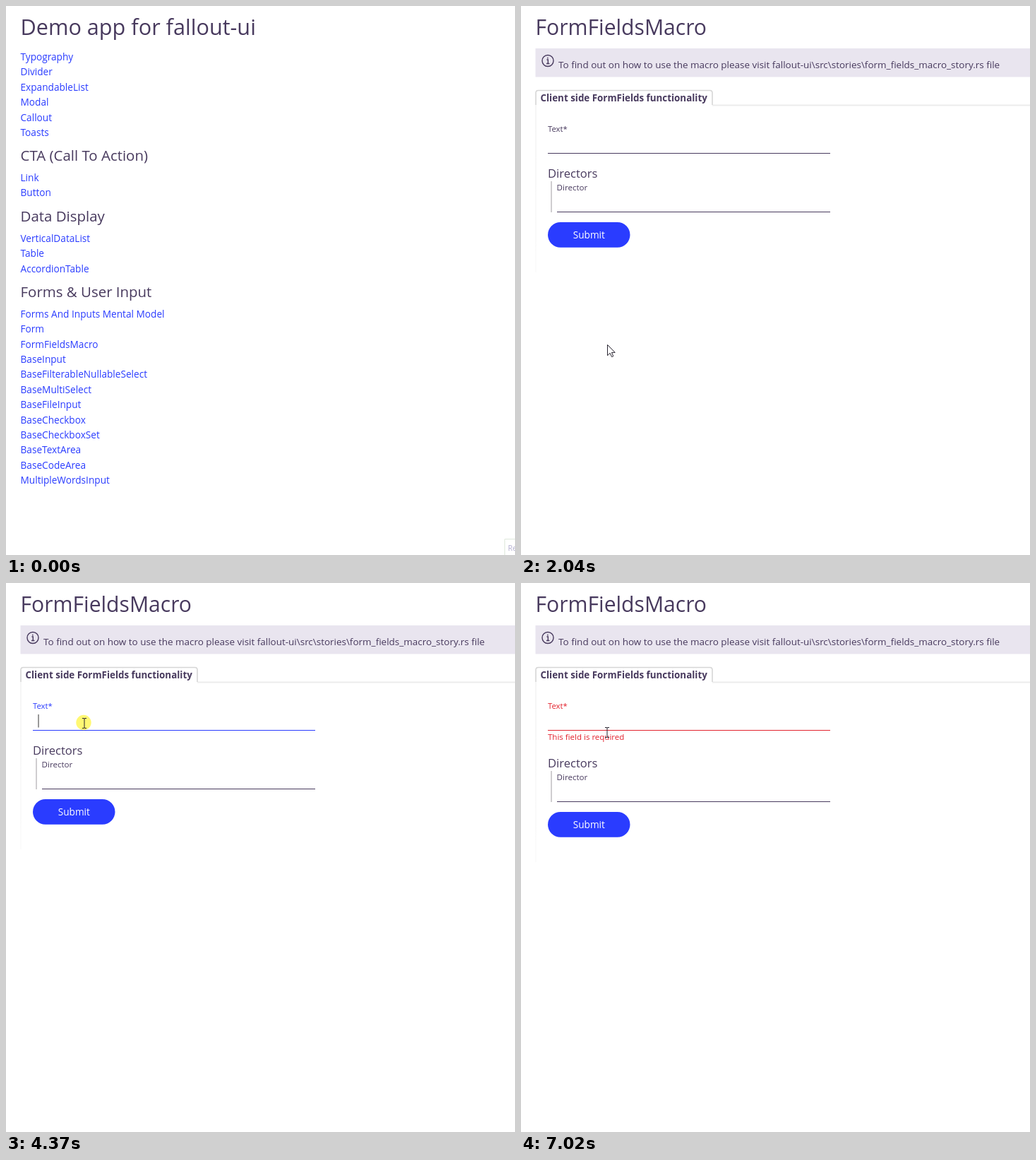
Write an HTML page that moves like this. It is 721x777 px and loops after 8000 ms.

```html
<!DOCTYPE html>
<html lang="en">
<head>
<meta charset="utf-8">
<title>Component demo</title>
<style>
  html, body { margin: 0; width: 100%; height: 100%; overflow: hidden; background: #fff; }
  svg { display: block; width: 721px; height: 777px; }
  text { font: 13.65px "Open Sans", "Noto Sans", sans-serif; fill: #483a5e; }
  .link { fill: #2a3cff; }
  text.h1 { font-size: 30.6px; }
  text.h2 { font-size: 20.45px; }
  text.small { font-size: 11.6px; }
  #form { --accent: #483a5e; }
  #form.focus { --accent: #2a3cff; }
  #form.error { --accent: #e3242f; }
  #label, #message { fill: var(--accent); }
  #field { stroke: var(--accent); }
  .cursor path { fill: #fff; stroke: #27232f; stroke-width: 1; stroke-linejoin: round; }
  .cursor path.line { fill: none; }
</style>
</head>
<body>
<svg viewBox="0 0 721 777">
  <defs>
    <linearGradient id="edge" x1="0" y1="0" x2="0" y2="1">
      <stop offset="0" stop-color="#ececec"/>
      <stop offset="1" stop-color="#f8f8f8"/>
    </linearGradient>
  </defs>

  <g id="menu">
    <text class="h1" x="20.5" y="41">Demo app for fallout-ui</text>
    <path id="underline" d="M20.5 483.5H129" stroke="#2a3cff"/>
    <g id="hint">
      <path d="M722 754.5H706.5V778" fill="none" stroke="#dfe8dc"/>
      <text x="711" y="771" style="font-size:10.5px;fill:#b3aed0">Re</text>
    </g>
  </g>

  <g id="form">
    <text class="h1" x="20.5" y="41" style="font-size:30.1px">FormFieldsMacro</text>
    <rect x="20.5" y="60" width="701" height="40.5" fill="#e9e5ef"/>
    <circle cx="38" cy="77.5" r="8" fill="none" stroke="#483a5e" stroke-width="1.4"/>
    <path d="M36.5 76h1.8v5.3M36 81.5h4.4M37.8 72.8v1.6" fill="none" stroke="#483a5e" stroke-width="1.4"/>
    <text x="53" y="88" style="font-size:13.48px">To find out on how to use the macro please visit fallout-ui\src\stories\form_fields_macro_story.rs file</text>

    <path d="M271 140.5H721" stroke="#ececec" stroke-width="2"/>
    <rect id="side" x="20.5" y="140" width="1" height="237" fill="url(#edge)"/>
    <path d="M21 140V123q0-3.5 3.5-3.5h243q3.5 0 3.5 3.5V140" fill="none" stroke="#d6d6d6" stroke-width="1.6"/>
    <text x="27.5" y="134.7" style="font-size:13.39px;font-weight:700">Client side FormFields functionality</text>

    <text class="small" id="label" x="38" y="178.3" style="font-size:11.3px">Text*</text>
    <path id="field" d="M38 208.5H438"/>
    <path id="caret" d="M46 186V204.5" stroke="#333"/>
    <text class="small" id="message" x="38" y="222" style="font-size:11.5px">This field is required</text>

    <g id="lower">
      <text x="38" y="242.8" style="font-size:16.6px">Directors</text>
      <path d="M43 248V292" stroke="#cfcdd0" stroke-width="2"/>
      <text class="small" x="50.5" y="261.3">Director</text>
      <path d="M51 291.5H438" stroke="#483a5e"/>
      <rect x="38" y="306" width="116.5" height="35.8" rx="17.9" fill="#2a3cff"/>
      <text x="96.3" y="329" text-anchor="middle" style="fill:#fff">Submit</text>
    </g>
  </g>

  <g id="pointer">
    <circle id="halo" cx="-1" cy="-.5" r="10.7" fill="#fff200" opacity=".55"/>
    <g class="cursor" id="arrow">
      <path d="M.5 .5v15.2l3.6-3.4 2.5 5.3 2.2-1-2.4-5.2h4.8z"/>
    </g>
    <g class="cursor" id="hand">
      <path d="M-1.5 1.2q0-1.5 1.5-1.5t1.5 1.5V7l5 .8q2.8.5 2.8 3V14q0 1.5-1.2 3.2V19.500H0v-2l-4.800-6q-1-1.600.3-2.300t3 1.800z"/>
      <path class="line" d="M1.500 7v3M4.200 7.500v2.500M6.800 8v2.300"/>
    </g>
    <g class="cursor" id="beam">
      <path class="line" d="M-3-6.500h2q1 0 1 1 0-1 1-1h2M0-5.500v12M-3 7.500h2q1 0 1-1 0 1 1 1h2"/>
    </g>
  </g>
</svg>
<script>
const LOOP = 8000, STEP = 70, PAGE_AT = 2040, FOCUS_AT = 4300, ERROR_AT = 5000;
const $ = id => document.getElementById(id);

const sections = [
  [null, 77, "Typography Divider ExpandableList Modal Callout Toasts".split(" ")],
  ["CTA (Call To Action)", 248, ["Link", "Button"]],
  ["Data Display", 333.700, ["VerticalDataList", "Table", "AccordionTable"]],
  ["Forms & User Input", 440.700, ["Forms And Inputs Mental Model",
    ..."Form FormFieldsMacro BaseInput BaseFilterableNullableSelect BaseMultiSelect BaseFileInput BaseCheckbox BaseCheckboxSet BaseTextArea BaseCodeArea MultipleWordsInput".split(" ")]]
];

function addText(text, y, cls) {
  const el = document.createElementNS("http://www.w3.org/2000/svg", "text");
  el.setAttribute("class", cls);
  el.setAttribute("x", 20.5);
  el.setAttribute("y", y);
  el.textContent = text;
  $("menu").append(el);
}

for (const [title, y, links] of sections) {
  if (title) addText(title, y - 29, "h2");
  links.forEach((name, i) => addText(name, y + i * 21.4, "link"));
}

const smooth = p => p * p * (3 - 2 * p);
const easeOut = p => 1 - (1 - p) ** 2;

// Pointer moves: first and last step, easing, Bezier control points
const moves = [
  [70, 830, easeOut, [[712, 765], [520, 600], [300, 510], [168, 496]]],
  [900, 1110, easeOut, [[168, 496], [150, 491], [135, 483], [123, 480]]],
  [2040, 2040, smooth, [[122, 479], [122, 479], [122, 479], [122, 479]]],
  [2640, 3480, smooth, [[122, 479], [230, 400], [322, 270], [169, 222]]],
  [3880, 4230, smooth, [[169, 222], [150, 216], [130, 202], [111, 198]]],
  [4440, 5000, easeOut, [[111, 198], [160, 235], [225, 300], [280, 339]]],
  [5140, 5270, easeOut, [[280, 339], [278, 337], [276, 335], [275, 333]]],
  [5800, 6220, smooth, [[275, 333], [225, 295], [165, 240], [122, 211]]]
];
const clicks = [[1970, 2040], [4300, 4440], [5000, 5140], [6950, 7020]];

function pointerAt(t) {
  const move = moves.findLast(m => m[0] <= t);
  if (!move) return null;
  const [start, end, ease, [a, b, c, d]] = move;
  const past = Math.floor((t - start) / STEP + 1) * STEP;
  const p = ease(Math.min(1, past / (end - start + STEP))), q = 1 - p;
  return [0, 1].map(k =>
    q ** 3 * a[k] + 3 * q * q * p * b[k] + 3 * q * p * p * c[k] + p ** 3 * d[k]);
}

function show(id, on) {
  $(id).style.display = on ? "" : "none";
}

function cursorKind(x, y, t, shift) {
  const inside = (l, top, r, bottom) => x >= l && x <= r && y >= top && y <= bottom;
  if (t < PAGE_AT) return inside(20, 468, 130, 490) ? "hand" : "arrow";
  const overText = inside(38, 184, 438, 209)
    || inside(51, 265 + shift, 438, 292 + shift)
    || (shift && inside(38, 209, 146, 226));
  return overText ? "beam" : "arrow";
}

function draw() {
  const t = performance.now() % LOOP;
  const first = t < PAGE_AT, error = t >= ERROR_AT;
  const focus = t >= FOCUS_AT && !error;
  const shift = error ? 18 : 0;

  show("menu", first);
  show("form", !first);
  show("hint", t < 70);
  $("form").setAttribute("class", error ? "error" : focus ? "focus" : "");
  show("caret", focus && t < FOCUS_AT + 500);
  show("message", error);
  $("lower").setAttribute("transform", `translate(0 ${shift})`);
  $("side").setAttribute("height", 237 + shift);

  const pos = pointerAt(t);
  show("pointer", pos);
  if (pos) {
    const kind = cursorKind(...pos, t, shift);
    for (const id of ["arrow", "hand", "beam"]) show(id, id === kind);
    show("underline", kind === "hand");
    show("halo", clicks.some(([from, to]) => t >= from && t < to));
    $("pointer").setAttribute("transform", `translate(${pos.map(Math.round)})`);
  } else {
    show("underline", false);
  }
  requestAnimationFrame(draw);
}
draw();
</script>
</body>
</html>
```
